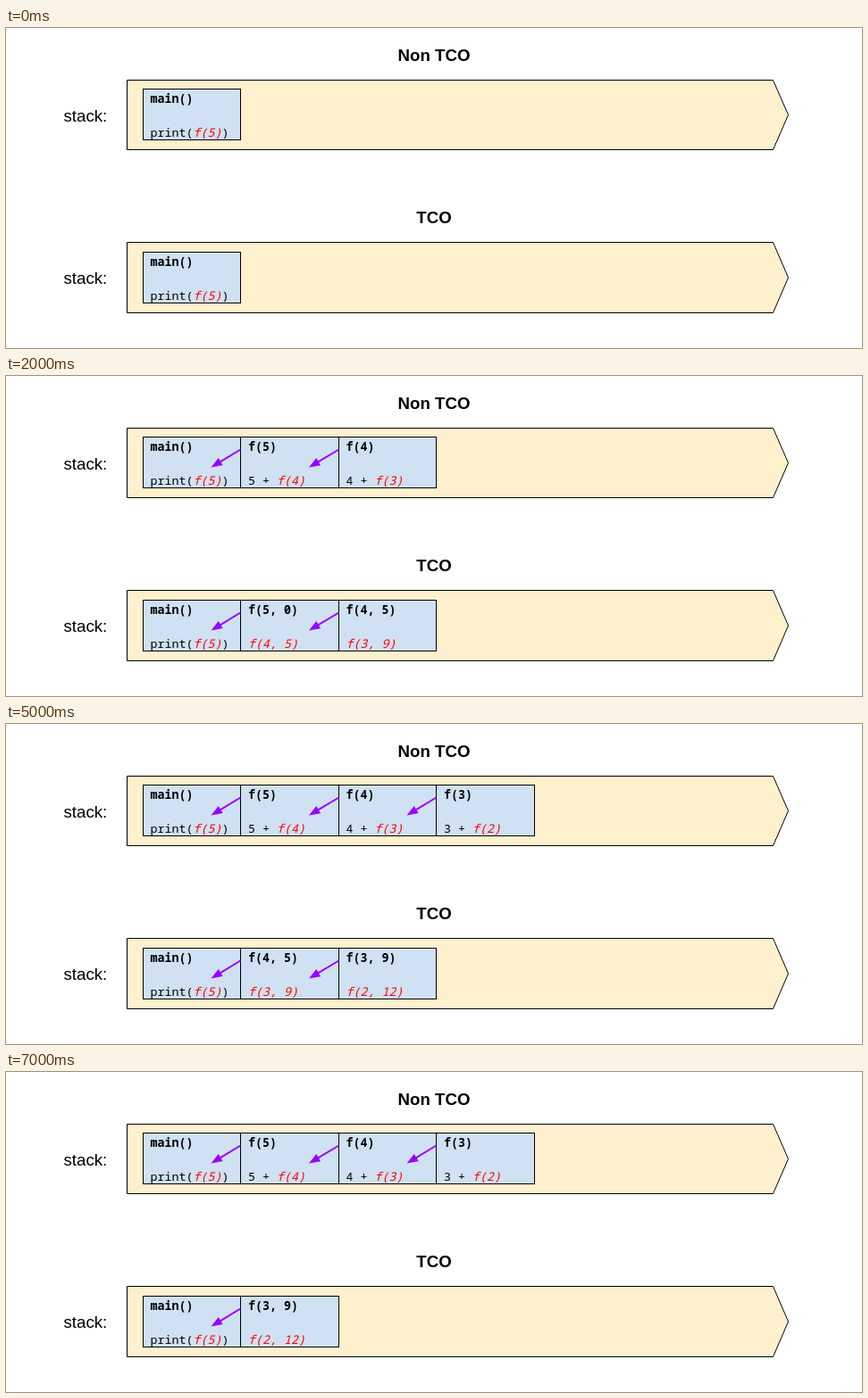
Recreate the animation shown at these times as an HTML page. Size 958 by 359 pixels, loop 8000 ms.

```html
<!DOCTYPE html>
<html lang="en">
<head>
<meta charset="utf-8">
<title>Call stack with and without TCO</title>
<style>
  html, body { margin: 0; width: 100%; height: 100%; overflow: hidden; background: #fff; }
  svg { display: block; }
  text { font: 18.667px "Liberation Sans", Arial, sans-serif; }
  .title { font-weight: bold; text-anchor: middle; }
  .code { font: 13.333px "Noto Sans Mono", monospace; }
  .name { font-weight: bold; }
  .call { font-style: italic; fill: #f00; }
  .band { fill: #fff0ce; stroke: #000; }
  .cell { fill: #cfe1f2; stroke: #000; }
  .cell.done { fill: #d9d9d9; }
  .arrow line { stroke: #90f; stroke-width: 2; }
  .arrow path { fill: #90f; }
</style>
</head>
<body>
<svg width="958" height="359" viewBox="0 0 958 359">
  <text class="title" x="479" y="36.5">Non TCO</text>
  <text class="title" x="479" y="219">TCO</text>
  <text x="64.5" y="104.5">stack:</text>
  <text x="64.5" y="287">stack:</text>
  <path class="band" d="M135.5 58.5H858.5L875.5 97.5L858.5 136.5H135.5Z"/>
  <path class="band" d="M135.5 240.5H858.5L875.5 280L858.5 319.5H135.5Z"/>
  <g id="plain"></g>
  <g id="tail" transform="translate(0 183)"></g>
</svg>
<script>
const STEP = 1000, STEPS = 8, PITCH = 109.5;

// Each cell: function name, pending text before the call, the call, text after it.
const main = ["main()", "print(", "f(5)", ")"];
const plainCell = n => [`f(${n})`, `${n} + `, `f(${n - 1})`, ""];
const tailCell = (n, sum) => [`f(${n}, ${sum})`, "", `f(${n - 1}, ${sum + n})`, ""];

const plainCells = [main, ...[5, 4, 3].map(plainCell)];
const tailCells = [tailCell(5, 0), tailCell(4, 5), tailCell(3, 9)];
const plainDepth = [1, 2, 3, 3, 3, 4, 4, 4];

const edge = i => 153.5 + Math.floor(PITCH * i);

function cell([name, before, call, after], i, done) {
  const x = 161.5 + PITCH * i;
  return `<rect class="cell${done ? " done" : ""}" x="${edge(i)}" y="68.5" width="${edge(i + 1) - edge(i)}" height="57"/>
    <text class="code name" x="${x}" y="84">${name}</text>
    <text class="code" x="${x}" y="122">${before}<tspan class="call">${call}</tspan>${after}</text>`;
}

function arrow(from, to) {
  const x1 = edge(from), x2 = 229.5 + PITCH * to, y1 = 82.5, y2 = 102.5;
  const length = Math.hypot(x2 - x1, y2 - y1);
  const angle = Math.atan2(y2 - y1, x2 - x1) * 180 / Math.PI;
  return `<g class="arrow" transform="translate(${x1} ${y1}) rotate(${angle})">
    <line x2="${length - 10}"/><path d="M${length} 0l-12.5 -4.7v9.4z"/></g>`;
}

// With skip, the second cell is finished and the third returns straight to main.
function stack(cells, skip) {
  const arrows = skip ? [arrow(2, 0)] : cells.slice(1).map((_, i) => arrow(i + 1, i));
  return cells.map((c, i) => cell(c, i, skip && i === 1)).join("") + arrows.join("");
}

function tailStack(step) {
  if (step < 2) return stack([main, ...tailCells.slice(0, step)]);
  const first = Math.floor((step - 1) / 3), phase = (step - 1) % 3;
  return stack([main, ...tailCells.slice(first, first + (phase ? 2 : 1))], phase === 2);
}

const plain = document.getElementById("plain"), tail = document.getElementById("tail");
let shown = -1;

function draw() {
  const step = Math.floor(performance.now() / STEP) % STEPS;
  if (step !== shown) {
    plain.innerHTML = stack(plainCells.slice(0, plainDepth[step]));
    tail.innerHTML = tailStack(step);
    shown = step;
  }
  requestAnimationFrame(draw);
}
draw();
</script>
</body>
</html>
```
